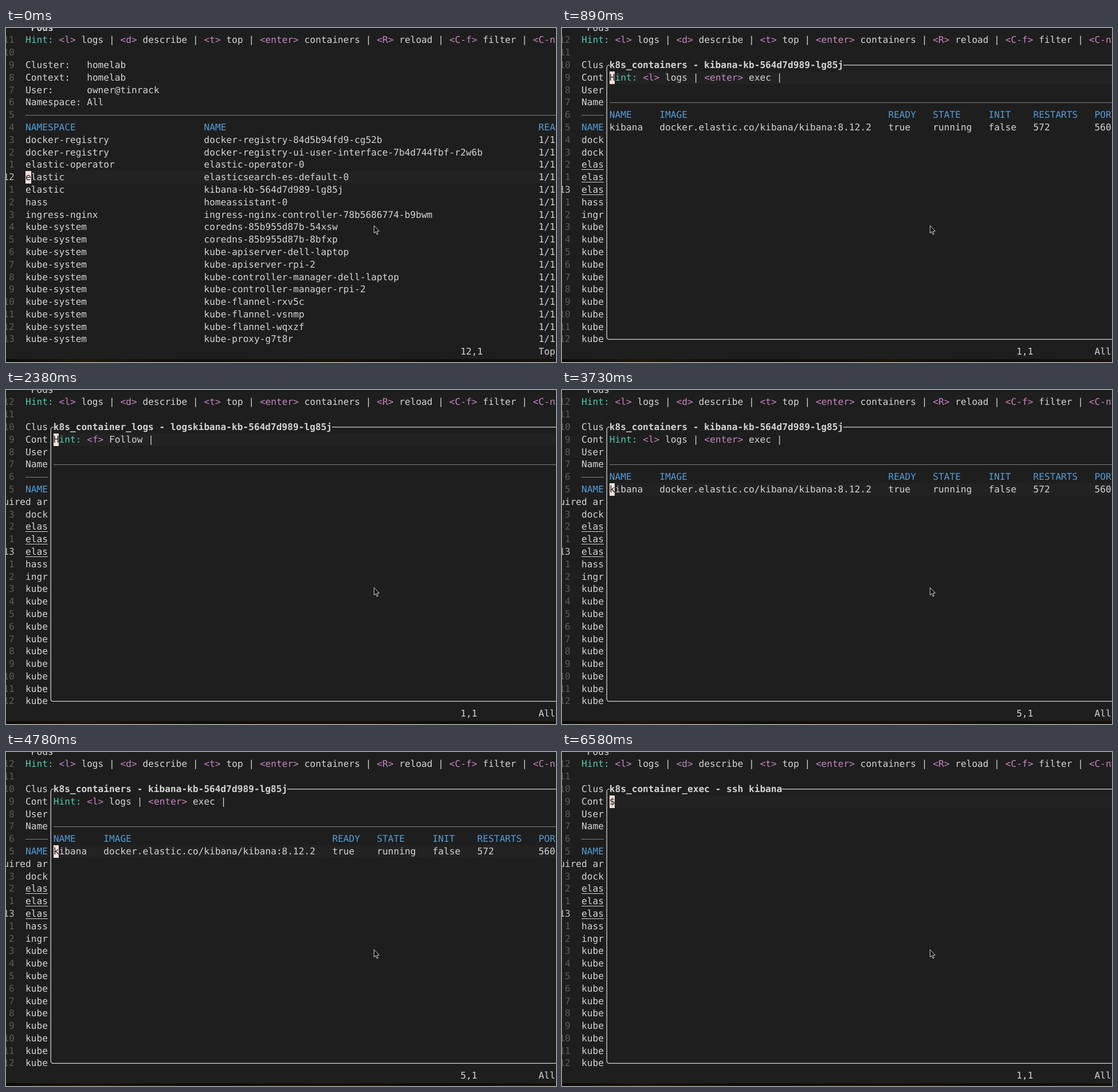
Recreate the animation shown at these times as an HTML page. Size 960 by 584 pixels, loop 8 s.

```html
<!DOCTYPE html>
<html lang="en">
<head>
<meta charset="utf-8">
<title>Pods</title>
<style>
html, body { margin: 0; width: 100%; height: 100%; overflow: hidden; background: #1e1e1e; }
#stage {
  position: absolute; left: 0; top: 0; width: 960px; height: 584px; overflow: hidden;
  background: #1e1e1e; color: #d4d4d4;
  font: 16.167px/21.79px "DejaVu Sans Mono", monospace;
  font-variant-ligatures: none; text-rendering: geometricPrecision;
}
#stage div, #stage span, #stage svg { position: absolute; }
#stage span { white-space: pre; }
.num { color: #5a5a5a; }
.now { color: #bbbbbb; }
.teal { color: #4ec9b0; }
.key { color: #c586c0; }
.head { color: #569cd6; }
.green { color: #6a9955; }
.gold { color: #d7ba7d; }
.str { color: #ce9178; }
.bold { font-weight: bold; }
.title { font-weight: bold; background: #1e1e1e; }
.line { background: #222222; }
.caret { background: #f5e0dc; color: #1e1e1e; overflow: hidden; }
.rule { background: #808080; }
.under { background: #d4d4d4; }
.float { background: #1e1e1e; }
.frame { left: 0; top: 0; fill: none; stroke: #d4d4d4; stroke-width: 1.3; }
#edge {
  left: 0; top: 579px; width: 960px; height: 5px;
  background: linear-gradient(90deg, #0d0b08, #1d160a 15%, #0f0d08 35%, #191208 60%, #0e0c08 80%, #17130b);
}
#mouse { left: 640px; top: 343px; }
</style>
</head>
<body>
<div id="stage">
  <div id="screen"></div>
  <div id="edge"></div>
  <svg id="mouse" width="16" height="22" viewBox="0 0 16 22">
    <path d="M2.4 2.6V15.6L5.3 12.9L7.4 18L9.4 17.1L7.3 12.2H11.4Z" fill="#0a0a0a" stroke="#e8e8e8" stroke-width=".9" stroke-linejoin="round"/>
  </svg>
</div>
<script>
const CW = 9.733, RH = 21.79, LOOP = 8000;
const X = c => 34.1 + c * CW;
const Y = r => r * RH - 11.3;
const mid = r => Y(r) + RH / 2;

const HINT = "Hint: <l> logs | <d> describe | <t> top | <enter> containers | <R> reload | <C-f> filter | <C-n>";
const PODS = `docker-registry docker-registry-84d5b94fd9-cg52b
docker-registry docker-registry-ui-user-interface-7b4d744fbf-r2w6b
elastic-operator elastic-operator-0
elastic elasticsearch-es-default-0
elastic kibana-kb-564d7d989-lg85j
hass homeassistant-0
ingress-nginx ingress-nginx-controller-78b5686774-b9bwm
kube-system coredns-85b955d87b-54xsw
kube-system coredns-85b955d87b-8bfxp
kube-system kube-apiserver-dell-laptop
kube-system kube-apiserver-rpi-2
kube-system kube-controller-manager-dell-laptop
kube-system kube-controller-manager-rpi-2
kube-system kube-flannel-rxv5c
kube-system kube-flannel-vsnmp
kube-system kube-flannel-wqxzf
kube-system kube-proxy-g7t8r`.split("\n").map(s => s.split(" "));

// time, level, logger, message; a bare word as message is a disabled plugin
const LOGS = `09:26.654|INFO |root|Kibana is starting
09:26.942|INFO |node|Kibana process configured with roles: [backgr
10:06.076|INFO |plugins-service|cloudChat
10:06.147|INFO |plugins-service|cloudExperiments
10:06.149|INFO |plugins-service|cloudFullStory
10:08.425|INFO |plugins-service|profilingDataAccess
10:08.426|INFO |plugins-service|profiling
10:09.083|INFO |plugins-service|securitySolutionServerless
10:09.085|INFO |plugins-service|serverless
10:09.089|INFO |plugins-service|serverlessObservability
10:09.091|INFO |plugins-service|serverlessSearch
10:11.676|INFO |http.server.Preboot|http server running at http://
10:12.579|INFO |plugins-system.preboot|Setting up [1] plugins: [in
10:12.839|WARN |config.deprecation|The default mechanism for Repor
10:33.154|INFO |plugins-system.standard|Setting up [149] plugins: [
10:34.173|INFO |plugins.taskManager|TaskManager is identified by t
10:36.136|INFO |custom-branding-service|CustomBrandingService regi`.split("\n").map(s => {
  const [time, level, logger, msg] = s.split("|");
  const text = msg.includes(" ") ? msg : `Plugin "${msg}" is disabled.`;
  return `[2024-06-03T08:${time}+00:00][${level}][${logger}] ${text}`;
});
LOGS.unshift('{"log.level":"info","@timestamp":"2024-06-03T08:09:17.734Z","log.logger":"elastic-apm-node"');

const TOKENS = /(Hint:)|(<[^>]*>)|(\/\/.*)|([[\]])|("[^"]*"|(?<=\[)[^\]]+)/g;
const CLASSES = ["teal", "key", "green", "gold", "str"];

const esc = s => s.replace(/&/g, "&amp;").replace(/</g, "&lt;");
const put = (r, c, s, cls = "") =>
  `<span class="${cls}" style="left:${X(c)}px;top:${Y(r)}px">${esc(s)}</span>`;
const box = (x, y, w, h, cls) =>
  `<div class="${cls}" style="left:${x}px;top:${y}px;width:${w}px;height:${h}px"></div>`;
const rule = (r, c) => box(X(c), Math.floor(mid(r)), 960 - X(c), 1, "rule");
const under = (r, c, n) => box(X(c), Math.floor(Y(r) + 19.6), n * CW, 1, "under");
const cursorLine = (r, c) => box(X(c), Y(r), 960 - X(c), RH, "line");
const caret = (r, c, ch) =>
  `<span class="caret" style="left:${X(c)}px;top:${Y(r)}px;width:${CW}px;height:${RH}px">${ch}</span>`;

function rich(r, c, s) {
  let out = "", at = 0;
  for (const m of s.matchAll(TOKENS)) {
    if (m.index > at) out += put(r, c + at, s.slice(at, m.index));
    out += put(r, c + m.index, m[0], CLASSES[m.slice(1).findIndex(Boolean)]);
    at = m.index + m[0].length;
  }
  return at < s.length ? out + put(r, c + at, s.slice(at)) : out;
}

function podList(cur, o) {
  let out = o.view ? "" : cursorLine(cur, 0);
  out += put(0, 1, "Pods", o.view ? "" : "bold");
  for (let r = 1; r < 26; r++) {
    if (o.err && r === 9) continue;
    const n = String(r === cur ? r : Math.abs(r - cur));
    out += put(r, -2 - n.length, n, r === cur ? "now" : "num");
  }
  out += rich(1, 0, HINT);
  [["Cluster:", "homelab"], ["Context:", "homelab"], ["User:", "owner@tinrack"], ["Namespace:", "All"]]
    .forEach(([k, v], i) => out += put(3 + i, 0, k) + put(3 + i, 11, v));
  out += rule(7, 0);
  out += put(8, 0, "NAMESPACE", "head") + put(8, 32, "NAME", "head") + put(8, 92, "READY", "head");
  PODS.forEach(([ns, name], i) => {
    const r = 9 + i;
    if (o.err && r === 9) out += put(r, -4, "uired ar");
    else out += put(r, 0, ns) + put(r, 32, name) + put(r, 92, "1/1");
  });
  if (o.marks) out += under(11, 0, 7) + under(11, 32, 7) + under(12, 0, 7) + under(13, 0, 7);
  return out;
}

function popup(title, line) {
  const x = X(4);
  return box(x, Y(3), 960 - x, RH * 23, "float") +
    `<svg class="frame" width="960" height="584"><rect x="78.2" y="${mid(3)}" width="900" height="${RH * 22}" rx="4"/></svg>` +
    put(3, 5, title, "title") + cursorLine(3 + line, 5);
}

const POD = "kibana-kb-564d7d989-lg85j";
const VIEWS = {
  containers(o) {
    let out = popup("k8s_containers - " + POD, o.line) + rich(4, 5, "Hint: <l> logs | <enter> exec |") + rule(6, 5);
    [["NAME", "kibana", 5], ["IMAGE", "docker.elastic.co/kibana/kibana:8.12.2", 14], ["READY", "true", 55],
     ["STATE", "running", 63], ["INIT", "false", 73], ["RESTARTS", "572", 81], ["PORTS", "5601", 92]]
      .forEach(([h, v, c]) => out += put(7, c, h, "head") + put(8, c, v));
    if (o.words) out += under(8, 5, 6) + under(8, 32, 6) + under(8, 39, 6);
    return out;
  },
  logs(o) {
    let out = popup("k8s_container_logs - logs" + POD, o.line) + rich(4, 5, "Hint: <f> Follow |") + rule(6, 5);
    if (o.full) LOGS.forEach((s, i) => out += rich(7 + i, 5, s));
    return out;
  },
  exec: o => popup("k8s_container_exec - ssh kibana", o.line)
};

const STEPS = [
  { at: 0, line: 12, ch: "e", pos: "12,1", part: "Top" },
  { at: 140, line: 13, ch: "e", pos: "13,1", part: "Top" },
  { at: 290, line: 13, ch: "e", pos: "13,1", part: "Top", marks: 1 },
  { at: 890, view: "containers", line: 1, ch: "H" },
  { at: 1640, view: "containers", line: 3, ch: "─" },
  { at: 1930, view: "containers", line: 4, ch: "N" },
  { at: 2380, view: "logs", line: 1, ch: "H", err: 1 },
  { at: 3280, view: "containers", line: 4, ch: "N", err: 1 },
  { at: 3730, view: "containers", line: 5, ch: "k", err: 1 },
  { at: 4180, view: "logs", line: 1, ch: "H", full: 1, part: "Top", err: 1 },
  { at: 4780, view: "containers", line: 5, ch: "k", err: 1 },
  { at: 5080, view: "containers", line: 5, ch: "k", words: 1, err: 1 },
  { at: 5230, view: "containers", line: 6, ch: "", pos: "6,0-1", err: 1 },
  { at: 5530, view: "containers", line: 5, ch: "k", err: 1 },
  { at: 5830, view: "exec", line: 1, ch: "", pos: "0,0-1", err: 1 },
  { at: 6580, view: "exec", line: 1, ch: "$", err: 1 }
];

function draw(step) {
  const o = { pos: step.line + ",1", part: "All", ...step };
  if (o.view) o.marks = 1;
  let out = podList(o.view ? 13 : o.line, o);
  if (o.view) out += VIEWS[o.view](o);
  out += o.view ? caret(3 + o.line, 5, o.ch) : caret(o.line, 0, o.ch);
  return out + put(26, 78, o.pos) + put(26, 92, o.part);
}

const screen = document.getElementById("screen");
let shown = -1;
function tick() {
  const t = performance.now() % LOOP;
  const i = STEPS.findLastIndex(s => s.at <= t);
  if (i !== shown) screen.innerHTML = draw(STEPS[shown = i]);
  requestAnimationFrame(tick);
}
tick();
</script>
</body>
</html>
```
